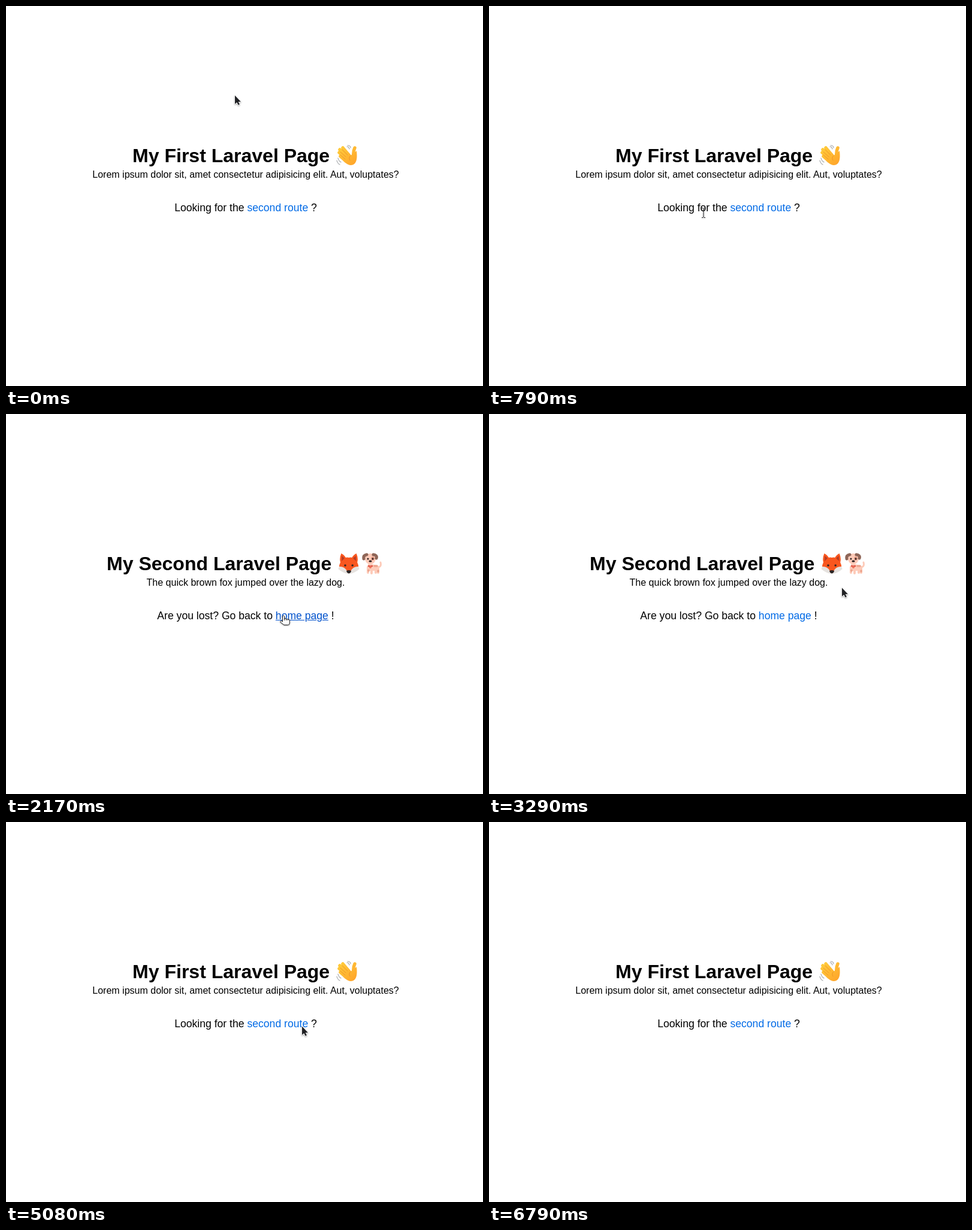
An HTML page that plays this animation: 796x635 px, repeating every 6.93 s.

```html
<!DOCTYPE html>
<html lang="en">
<head>
<meta charset="utf-8">
<title>Two pages</title>
<style>
  html, body { margin: 0; width: 100%; height: 100%; overflow: hidden; background: #fff; }
  body { position: relative; color: #000; font-family: "Liberation Sans", Arial, sans-serif; }
  .page { position: absolute; left: 0; top: 0; width: 800px; height: 635px; text-align: center; white-space: nowrap; }
  .page[hidden] { display: none; }
  h1, p { position: absolute; left: 0; width: 800px; margin: 0; }
  h1 { top: 230px; font-size: 32px; line-height: 40px; }
  /* room for a space and the emoji */
  h1 span { padding-right: calc(.278em + var(--emoji) * 1.245em); }
  .lead { top: 272px; font-size: 16px; line-height: 19px; }
  .nav { top: 327px; font-size: 17.6px; line-height: 20px; }
  a { color: #006ae6; text-decoration: none; }
  a.hover { color: #0052cc; text-decoration: underline; }
  svg { position: absolute; overflow: visible; pointer-events: none; }
  .emoji { top: 230px; width: 40px; height: 40px; }
  #cursor { filter: drop-shadow(0 1px 1px rgba(0, 0, 0, .35)); }
</style>
</head>
<body>
<div class="page" id="first" style="--emoji: 1">
  <h1><span>My First Laravel Page</span></h1>
  <p class="lead"><span>Lorem ipsum dolor sit, amet consectetur adipisicing elit. Aut, voluptates?</span></p>
  <p class="nav"><span>Looking for the <a>second route</a> ?</span></p>
  <svg class="emoji" style="left: 549px" fill="none" stroke-linecap="round">
    <defs>
      <linearGradient id="skin" x1="8" y1="8" x2="32" y2="34" gradientUnits="userSpaceOnUse">
        <stop stop-color="#ffca3a"/><stop offset="1" stop-color="#ffa62b"/>
      </linearGradient>
    </defs>
    <path d="M24 20L13 7M21 22L8 10M19 25L7 15M18 29L9 21M31 22Q30 13 33 7" stroke="url(#skin)" stroke-width="5.5"/>
    <path d="M17 14L26 20L36 12Q39 36 26 36Q21 36 14 29Z" fill="url(#skin)"/>
    <path d="M12 10L21 19M9 14L18 22M9 19L17 26M26 20Q22 24 25 28" stroke="#ef9528"/>
    <path d="M20 5Q23 5 24 9M21 3Q26 3 26 7M5 24Q6 29 10 31M3 28Q4 33 8 35" stroke="#a4a7aa" stroke-width="1.2"/>
  </svg>
</div>

<div class="page" id="second" style="--emoji: 2" hidden>
  <h1><span>My Second Laravel Page</span></h1>
  <p class="lead"><span>The quick brown fox jumped over the lazy dog.</span></p>
  <p class="nav"><span>Are you lost? Go back to <a>home page</a> !</span></p>
  <svg class="emoji" style="left: 552px">
    <g id="face">
      <path d="M6 20L2.500 29Q10 36 20 37V20Z" fill="#e6e2df"/>
      <path d="M20.200 10Q17 9 15 10Q12 5 7.500 3Q4 11 6 18Q4 22 4 25Q12 24 17 32H20.200Z" fill="#f9571f"/>
      <path d="M8.500 7L13 11L8 16Z" fill="#b73c25"/>
      <path d="M16 32Q18 31 20.200 31V36.500Q17 36 16 32Z" fill="#2b2525"/>
      <circle cx="14" cy="23" r="1.800" fill="#352622"/>
    </g>
    <use href="#face" transform="matrix(-1 0 0 1 40.2 0)"/>
  </svg>
  <svg class="emoji" style="left: 592px" fill="none" stroke="#fdcbb9" stroke-width="4" stroke-linecap="round">
    <path d="M28 26Q35 26 33 18" stroke-width="3"/>
    <path d="M15 23L26 26V29H14Z" stroke-width="6" fill="#fdcbb9"/>
    <path d="M12 26V35M18 28V36M25 28V35M29 26V35"/>
    <ellipse cx="16" cy="12" rx="7" ry="7"/>
    <ellipse cx="16" cy="13" rx="8" ry="8" fill="#fdcbb9" stroke="none"/>
    <path d="M23 24H27M29 32V33M13 31V32" stroke="#eda58e" stroke-width="3.500"/>
    <path d="M5 12Q4 6 10 5M26 11Q28 6 21 5" stroke="#8f6658" stroke-width="5"/>
    <path d="M20 11V12" stroke="#d98c75" stroke-width="5"/>
    <path d="M12 12H12M20 12H20M15 16H17" stroke="#2c2020" stroke-width="3"/>
    <path d="M13 24Q16 25 19 24" stroke="#df5648" stroke-width="2.500"/>
    <path d="M16 26H16" stroke="#ef735b"/>
  </svg>
</div>

<svg id="cursor" width="20" height="24" stroke="#202124" stroke-linejoin="round">
  <path data-kind="arrow" d="M0 .5V14.800L3.300 11.900L5.600 16.600L7.900 15.500L5.700 11H9.900Z" fill="#202124" stroke="#fff" stroke-width="1.600" paint-order="stroke"/>
  <path data-kind="text" d="M-3 -7.500H-1L0 -6.500L1 -7.500H3M0 -6.500V7.500M-3 8.500H-1L0 7.500L1 8.500H3" fill="none"/>
  <g data-kind="hand" fill="#fff" transform="translate(-1 -1)">
    <path d="M-1.500 11V2Q0 -1 1.500 2V6Q3 5 4.500 6.600Q6 5.600 7.200 7.200Q10.300 6.600 10.300 9V13Q10.300 16.500 7.500 16.500H1L-5.400 11.700Q-5 8 -1.500 11Z"/>
    <path d="M1.500 6V9M4.500 6.600V9M7.200 7.200V9" fill="none"/>
  </g>
</svg>

<script>
const LOOP = 6930;
const TO_SECOND = 1960, TO_FIRST = 5080;
const HOVER_LAG = 150;

const $ = s => document.querySelector(s);
const first = $('#first'), second = $('#second'), cursor = $('#cursor');
const links = document.querySelectorAll('a');
const shapes = [...cursor.children];

// Pointer strokes: start, end, number of jumps, key points of the curve
const strokes = [
  [0, 40, 2, [[381.5, 148.5], [379, 149]]],
  [210, 880, 17, [[370, 153], [215, 225], [212, 315], [274, 339], [434, 348]]],
  [920, 1080, 5, [[445, 346], [455, 341]]],
  [1250, 1540, 5, [[459, 339], [472, 335], [464, 337]]],
  [2830, 3290, 6, [[445, 362], [185, 350], [200, 205], [589, 290]]],
  [3380, 3460, 2, [[470, 363], [261, 342]]],
  [3540, 3710, 3, [[275, 315], [319, 300]]],
  [3880, 4210, 5, [[352, 325], [430, 350], [493.5, 341]]],
  [5880, 6540, 8, [[491, 343], [330, 350], [165, 210], [67, 26]]],
  [6630, 6790, 3, [[63, 15], [55, -30]]]
];

function spline(pts, u) {
  const last = pts.length - 1;
  const i = Math.min(Math.floor(u * last), last - 1);
  const f = u * last - i;
  const at = k => pts[Math.max(0, Math.min(last, k))];
  const [a, b, c, d] = [at(i - 1), at(i), at(i + 1), at(i + 2)];
  return [0, 1].map(k => b[k] + f / 2 * (c[k] - a[k] +
    f * (2 * a[k] - 5 * b[k] + 4 * c[k] - d[k] + f * (3 * (b[k] - c[k]) + d[k] - a[k]))));
}

function pointer(t) {
  const [from, to, jumps, pts] = strokes.findLast(s => s[0] <= t);
  const gaps = jumps - 1;
  const jump = Math.min(gaps, Math.floor((t - from) / (to - from) * gaps + .25));
  return spline(pts, jump / gaps);
}

function draw(t) {
  const onSecond = t >= TO_SECOND && t < TO_FIRST;
  first.hidden = onSecond;
  second.hidden = !onSecond;

  // A fresh page shows the plain arrow until hovering catches up
  const [x, y] = pointer(t);
  const fresh = [TO_SECOND, TO_FIRST].some(s => t >= s && t < s + HOVER_LAG / 2);
  const under = fresh ? null : document.elementFromPoint(x, y);
  const link = under && under.closest('a');
  const kind = link ? 'hand' : under && under.matches('span') ? 'text' : 'arrow';

  links.forEach(a => a.classList.toggle('hover', a === link));
  shapes.forEach(s => { s.style.display = s.dataset.kind === kind ? '' : 'none'; });
  cursor.style.left = Math.round(x * 2) / 2 + 'px';
  cursor.style.top = Math.round(y * 2) / 2 + 'px';
}

const start = performance.now();
function tick() {
  draw((performance.now() - start) % LOOP);
  requestAnimationFrame(tick);
}
tick();
</script>
</body>
</html>
```
